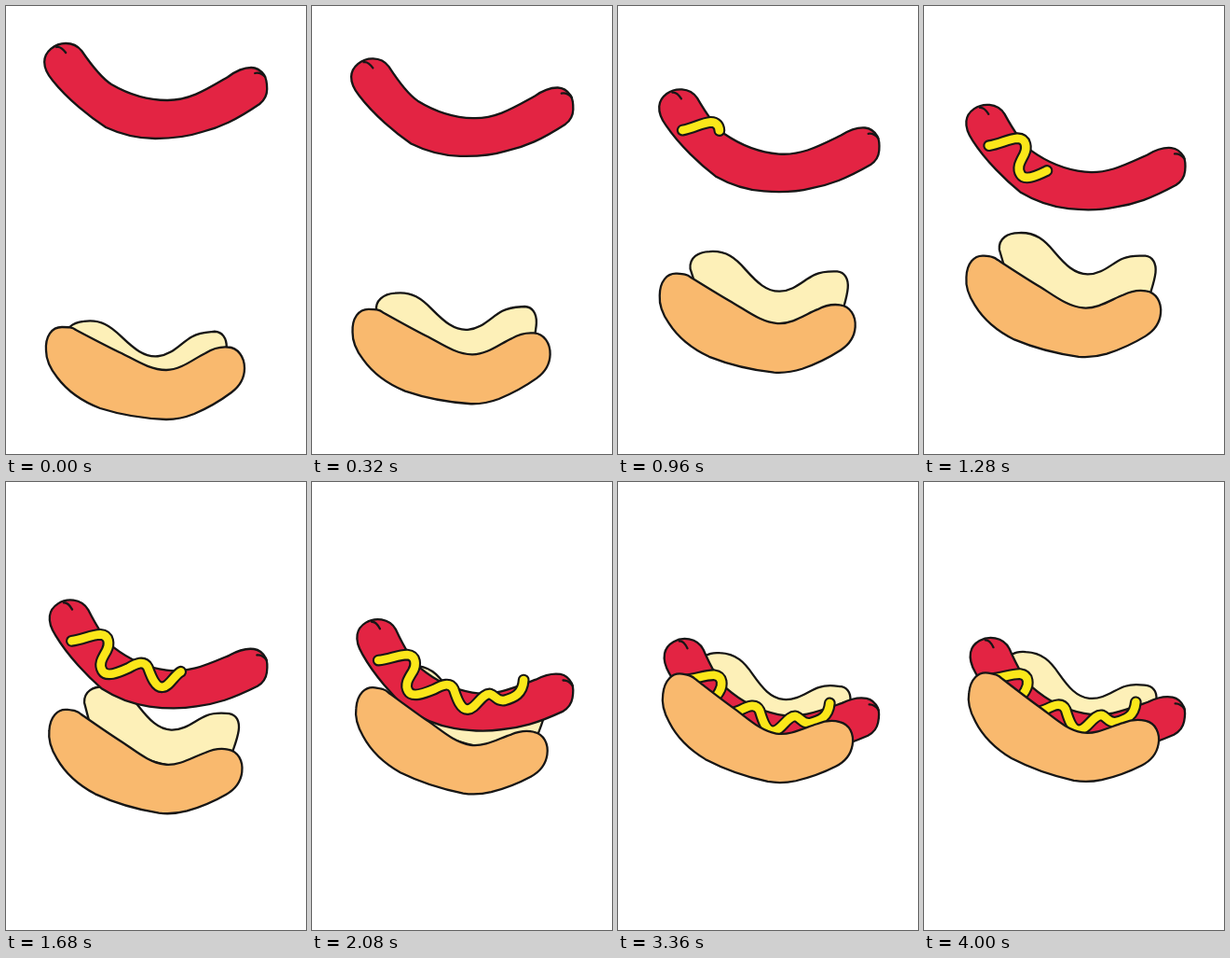
These frames come from a looping animation (322 px wide and 480 px high, 4480 ms). An HTML page:

```html
<!DOCTYPE html>
<html lang="en">
<head>
<meta charset="utf-8">
<title>Hot dog</title>
<style>
  html, body { margin: 0; width: 100%; height: 100%; overflow: hidden; background: #fff; }
  svg { display: block; width: 100%; height: 100%; }
  path { stroke: #161616; stroke-width: 2.3; stroke-linecap: round; stroke-linejoin: round; fill: none; }
  .cream { fill: #fdf0b8; }
  .meat { fill: #e32443; }
  .bread { fill: #f9b96e; }
  #mustard path { stroke-width: 12.8; }
  #mustard path + path { stroke: #fbe71a; stroke-width: 8.6; }
</style>
</head>
<body>
<svg viewBox="0 0 322 480">
  <g id="all">
    <g id="back">
      <path class="cream" d="M79 262C78 250 88 244 100 244C118 243 128 252 138 264C150 278 160 288 174 288C190 288 200 276 212 271C221 267 229 268 236 268C244 269 248 276 247 286C246 295 243 303 241 310C225 322 190 330 165 325C130 318 95 300 85 282Z"/>
    </g>
    <g id="sausage">
      <path class="meat" d="M41 60C41 49 52 40 64 40C72 40 77 43 81 48C92 64 102 77 113 84C132 95 152 101 173 101C197 101 214 90 238 76C246 70 255 66 263 66C270 66 274 70 277 74C280 79 280 84 280 89C280 96 277 101 272 105C247 122 230 130 210 135C195 140 175 142 160 142C140 142 122 137 107 130C90 119 66 100 50 80C44 73 41 67 41 60Z"/>
      <path d="M54 44C58 43 61 46 64 50M267 72C271 71 275 73 278 76"/>
      <g id="mustard" transform="rotate(-9.5 160 95) translate(0 -122.5)"></g>
    </g>
    <g id="front">
      <path class="bread" d="M43 369C42 354 49 344 60 344C67 344 71 344 75 347C94 357 111 366 124 372C140 380 155 390 172 390C188 390 203 377 214 372C222 367 231 365 238 365.5C249 366 256 376 256 388C256 400 250 408 242 414C230 423 216 431 202 437C192 441 184 443 172 443C148 442 120 437 101 431C80 423 64 410 55 398C47 388 43 378 43 369Z"/>
    </g>
  </g>
</svg>
<script>
  const LOOP = 4480, STEP = 80, LAST = 4000;
  const JOIN = 2400, SWING = 320;
  const BOB = [0, 7.5, 0, 4.3, 1.2, 3.2];
  const SQUIRT = 'M71 191C83 190 92 185 102 185C112 186 112 196 108 203C103 211 99 217 103 224C107 231 119 227 131 222C140 217 148 214 152 222C155 231 159 244 167 243.5C176 243 182 226 191 227C197 229 198 235 206 234C217 231 226 227 227 212';

  const $ = id => document.getElementById(id);
  const clamp = x => Math.min(1, Math.max(0, x));

  const mustard = $('mustard');
  mustard.innerHTML = `<path pathLength="1" d="${SQUIRT}"/>`.repeat(2);

  // Moves a part's pivot (px, py) to (x, y), turned and scaled about it.
  function pose(id, px, py, x, y, angle, scale = 1) {
    $(id).setAttribute('transform',
      `translate(${x} ${y}) rotate(${angle}) scale(${scale}) translate(${-px} ${-py})`);
  }

  // Settling bounce: eased swings between the BOB heights.
  function bob(t) {
    const s = Math.max(0, t - JOIN) / SWING;
    const i = Math.min(Math.floor(s), BOB.length - 2);
    const k = (1 - Math.cos(Math.PI * clamp(s - i))) / 2;
    return BOB[i] + (BOB[i + 1] - BOB[i]) * k;
  }

  function draw(t) {
    const p = clamp(t / JOIN);
    pose('sausage', 160, 95, 160.2, 95 + 141.4 * p, 10.96 * p);
    pose('front', 150, 395, 150 - 2.4 * p, 395 - 128.7 * p, 10 * p, 1 - 0.015 * p);
    pose('back', 165, 280, 153 + 36 * p - 19.5 * p * p, 368 - 148 * p ** 0.815,
      11 * p - 5.6, 1.02 - 0.04 * p);
    $('all').setAttribute('transform', `translate(0 ${bob(t)})`);

    const shown = clamp((t - 720) / 1240);
    mustard.style.display = shown > 0 ? '' : 'none';
    mustard.style.strokeDasharray = shown < 1 ? `${shown} 2` : 'none';
  }

  function tick() {
    const t = performance.now() % LOOP;
    draw(Math.min(LAST, Math.floor(t / STEP) * STEP));
    requestAnimationFrame(tick);
  }
  tick();
</script>
</body>
</html>
```
